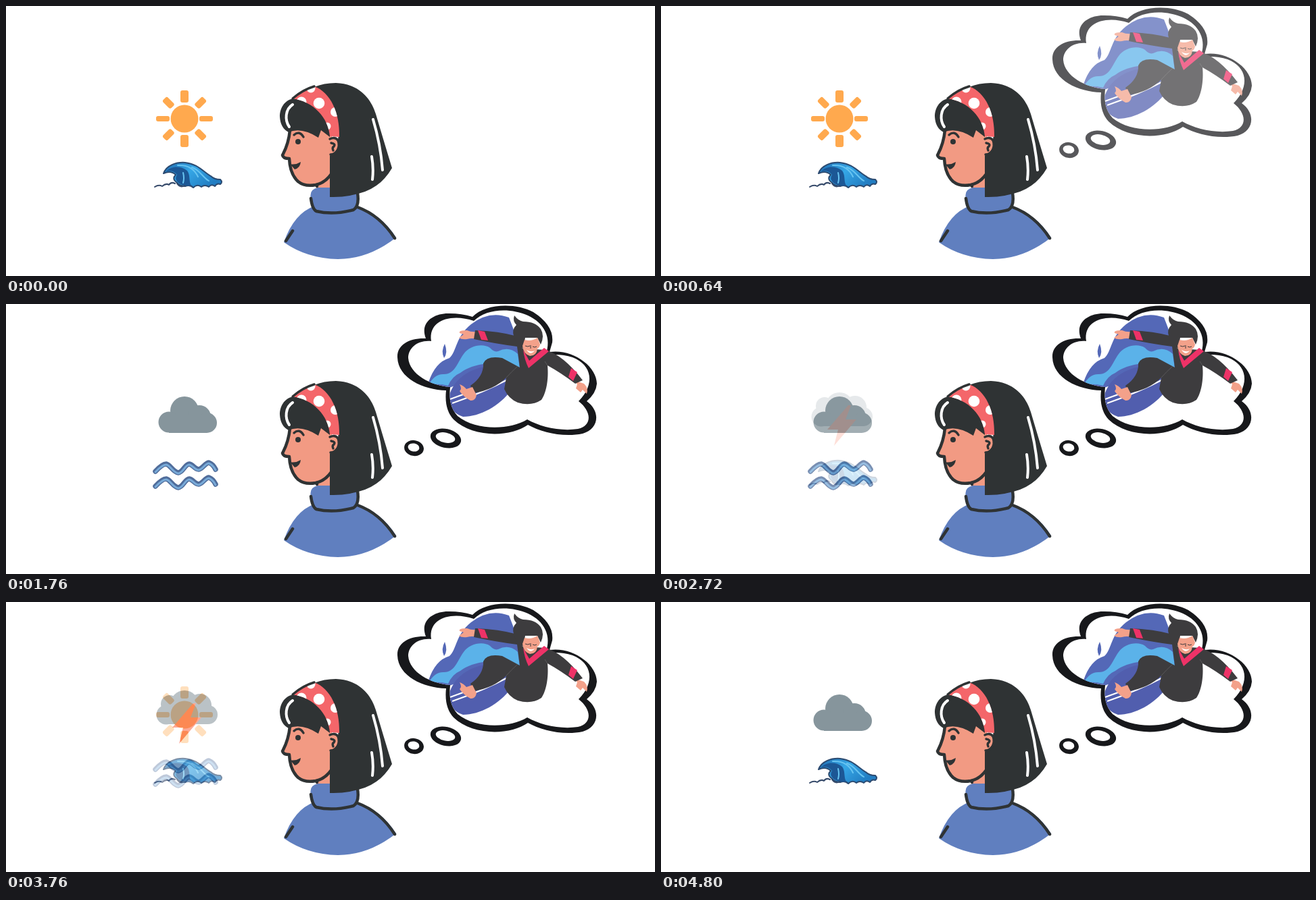
Recreate the animation shown at these times as an HTML page. Size 960 px wide and 400 px high, loop 5.36 s.

```html
<!DOCTYPE html>
<html lang="en">
<head>
<meta charset="utf-8">
<title>Daydream about surfing</title>
<style>
html, body { margin: 0; width: 100%; height: 100%; overflow: hidden; background: #fff; }
svg { display: block; width: 960px; height: 400px; }
#weather, #sea { isolation: isolate; }
#weather > g, #sea > g { mix-blend-mode: plus-lighter; opacity: 0; }
#thought { opacity: 0; }
.line { fill: none; stroke: #2f3334; stroke-width: 4.5; stroke-linecap: round; stroke-linejoin: round; }
.thin { stroke-width: 3.4; }
.shine { fill: none; stroke: #fff; stroke-width: 4; stroke-linecap: round; }
.ink { fill: #2f3334; }
.skin { fill: #f29a83; }
.wool { fill: #607fbf; }
.suit { fill: #3d3c3e; }
.tan { fill: #f3a18a; }
.pink { fill: #ee3267; }
</style>
</head>
<body>
<svg viewBox="0 0 960 400">
  <defs>
    <path id="inner" d="M629 55C609 53 595 65 595 80C597 104 628 121 657 123C655 142 658 155 668 166C695 188 745 187 771 171C790 182 820 189 846 185C868 180 866 159 847 144C872 119 867 90 838 79C826 75 812 74 798 76C808 50 796 28 772 17C745 5 710 7 692 25C660 14 624 23 629 55Z"/>
    <clipPath id="bubble"><use href="#inner"/></clipPath>
    <clipPath id="band"><path d="M423 137Q439 124 456 119C480 128 494 158 493 194L479 193C477 166 455 141 423 137Z"/></clipPath>
    <linearGradient id="water" x1="0" y1="0" x2="1" y2=".5">
      <stop offset="0" stop-color="#1d69ae"/>
      <stop offset=".5" stop-color="#35a6e6"/>
      <stop offset="1" stop-color="#227dc2"/>
    </linearGradient>
    <path id="ripple" d="M221 248Q231 237 237 237C243 238 247 249 255 250C262 249 265 237 271 237C277 238 279 245 285 245C291 244 295 235 300 235Q306 237 310 245"/>
  </defs>

  <g id="weather">
    <g id="sun" fill="#ffa94e"><circle cx="264" cy="167" r="20.5"/></g>
    <g id="cloud" fill="#86959c">
      <circle cx="264" cy="158" r="21"/><circle cx="286" cy="167" r="17"/>
      <circle cx="241" cy="175" r="15.5"/><circle cx="297" cy="176" r="15"/>
      <path d="M241 165H297V191H241Z"/>
    </g>
    <g id="storm">
      <g fill="#909da4">
        <circle cx="264" cy="152" r="21"/><circle cx="287" cy="153" r="17"/>
        <circle cx="242" cy="151" r="13"/><circle cx="237" cy="167" r="14.5"/>
        <circle cx="299" cy="167" r="14"/><path d="M237 155H299V181H237Z"/>
      </g>
      <path fill="#fb7454" d="M277 150L246 186H262L256 210L289 171H273L281 150Z"/>
    </g>
  </g>

  <g id="sea">
    <g id="wave" stroke-linejoin="round" stroke-linecap="round">
      <path fill="url(#water)" stroke="#2b4a70" stroke-width="2" d="M233 248C237 236 252 231 265 232C284 234 291 245 303 252Q308 257 317 257Q321 261 317 264Q312 262 309 267Q304 263 300 268Q294 264 289 268Q283 263 277 269Q272 264 265 267Q257 267 252 261Q245 256 251 250Q244 243 233 248Z"/>
      <path fill="#1c5795" d="M237 245C244 237 258 236 268 244C273 250 270 260 274 266Q262 268 254 261Q249 256 253 250Q247 242 237 245Z"/>
      <path fill="none" stroke="#67c4f1" stroke-width="2" d="M254 236C270 235 279 242 284 253M275 239C287 243 291 254 300 259M262 247Q264 255 262 262"/>
      <path fill="none" stroke="#364a6a" stroke-width="2" d="M220 268Q226 264 231 267Q237 262 241 265Q244 260 250 263M253 263Q258 270 264 266"/>
    </g>
    <g id="ripples" fill="none" stroke-linecap="round" stroke-linejoin="round">
      <g stroke="#506d9b" stroke-width="7.5"><use href="#ripple"/><use href="#ripple" y="22"/></g>
      <g stroke="#78aad8" stroke-width="3"><use href="#ripple" y="1"/><use href="#ripple" y="23"/></g>
    </g>
  </g>

  <g id="woman">
    <path class="wool" d="M411 350Q426 307 457 296H518Q556 309 577 343Q536 375 491 375Q445 374 411 350Z"/>
    <path class="skin" d="M459 255H484V280H459Z"/>
    <path class="wool" d="M451 285Q448 272 461 269H480L520 276Q524 295 515 302Q484 310 460 305Q453 301 451 285Z"/>
    <path class="line" d="M451 285Q453 301 459 304Q484 310 514 302Q523 296 520 277M520 298Q553 310 575 344M414 348L424 333M460 262V267"/>
    <path class="skin" d="M420 180C418 205 412 215 409 221Q410 226 420 226Q419 248 431 260Q442 268 458 265Q474 261 482 248V180Z"/>
    <path class="line" d="M420 184C418 205 412 215 409 221Q410 226 419 226Q420 249 432 260Q442 268 458 265Q472 262 481 249"/>
    <path class="ink" d="M456 120Q470 114 488 114C522 115 540 137 547 160Q557 194 571 240Q557 265 531 275Q505 284 479 283V222L490 206L492 190C492 158 478 129 456 120Z"/>
    <path class="ink" d="M425 137C411 140 405 152 405 164Q406 181 418 187Q437 179 462 195L466 184L479 194C481 164 456 139 425 137Z"/>
    <g clip-path="url(#band)">
      <path fill="#f4666a" d="M415 110H500V200H415Z"/>
      <g fill="#fff">
        <circle cx="463" cy="144" r="8.3"/><circle cx="437" cy="142" r="7.5"/>
        <circle cx="451" cy="122" r="6.5"/><circle cx="487" cy="157" r="7"/>
        <circle cx="475" cy="178" r="5.5"/>
      </g>
    </g>
    <path class="line thin" d="M424 137Q439 124 456 119"/>
    <path class="skin" d="M478 198Q485 193 490 198Q495 205 490 214Q487 220 479 221Z"/>
    <path class="line thin" d="M479 197Q487 193 491 199Q494 207 490 214Q486 220 480 220M481 203Q488 204 485 208Q482 210 484 214"/>
    <circle class="ink" cx="432" cy="201" r="4"/>
    <path class="line thin" d="M426 191Q434 184 440 194"/>
    <path class="ink" d="M420 234Q428 236 436 231Q435 240 427 242Z"/>
    <path class="shine" d="M424 146C413 153 412 169 419 179"/>
    <path class="shine" d="M543 168Q554 205 557 243M541 223Q544 240 542 257"/>
  </g>

  <g id="thought">
    <path fill="#17181b" d="M621 51C611 25 636 13 656 14Q674 14 690 19C708 0 752 -3 780 12Q811 32 808 57L804 71C838 66 874 92 874 118Q873 132 859 144C881 160 876 186 853 192C824 198 792 190 772 179C745 198 690 198 662 171Q648 156 651 128C617 127 580 110 579 79C578 61 596 50 621 51Z"/>
    <use href="#inner" fill="#fff"/>
    <g clip-path="url(#bubble)">
      <path fill="#5468b7" d="M625 116Q635 86 656 80C667 70 665 48 688 30Q715 9 744 20Q752 40 760 64V96L690 112L650 126Z"/>
      <path fill="#5bb2e9" d="M625 120Q634 103 648 104C664 104 668 86 677 74C686 61 706 58 716 65Q722 72 728 70Q744 62 757 74L760 96L712 88Q686 91 672 102Q660 107 654 121Q638 117 625 120Z"/>
      <path fill="#515eae" d="M655 138C663 105 697 90 729 92Q746 108 747 128C730 151 701 167 676 167Q655 160 655 138Z"/>
      <path fill="none" stroke="#fff" stroke-width="2" d="M657 141Q700 126 739 107M660 147Q706 131 742 112"/>
    </g>
    <path fill="#5468b7" d="M649 59Q654 72 648 80Q643 70 649 59Z"/>
    <path class="tan" d="M698 41Q688 42 682 39Q669 39 671 43L677 45L670 50Q674 53 682 52Q689 50 698 52ZM840 113L855 118Q862 125 859 133L853 127L850 131L843 125L845 119Z"/>
    <path class="suit" d="M694 39Q728 40 757 48L764 66L798 68Q825 76 853 113L842 118Q821 102 801 91C803 112 799 132 792 142Q777 152 757 146Q743 140 737 126L740 109Q722 127 692 132L687 121Q707 107 706 88Q711 76 734 80L760 94L756 63Q725 59 692 52Z"/>
    <path fill="none" stroke="#59585a" d="M757 92Q747 101 740 109M801 91L797 85"/>
    <path class="pink" d="M698 39L708 41L713 54L703 53ZM836 95L845 101L839 114L832 108ZM765 68L774 84L796 65L803 70L773 95Q767 83 765 68Z"/>
    <path class="tan" d="M671 119Q677 121 681 126L690 123L696 135Q694 144 687 143Q677 138 671 129Q675 126 671 119Z"/>
    <path class="suit" d="M752 17Q758 25 765 26Q783 26 791 37Q797 47 791 60L786 50H768L765 66Q753 59 751 47Q748 38 755 31Q749 25 752 17Z"/>
    <path class="tan" d="M767 53Q777 56 786 50L790 60Q789 65 786 66Q785 77 775 77Q765 74 764 62Z"/>
    <path fill="none" stroke="#3d3c3e" d="M768 62Q772 64 775 62M779 63Q782 65 785 63M776 61V66"/>
    <path fill="#fff" d="M770 68Q777 72 782 69Q776 77 770 68Z"/>
    <g fill="#17181b">
      <ellipse cx="650.5" cy="199" rx="23" ry="14" transform="rotate(12 650.5 199)"/>
      <ellipse cx="603.5" cy="213.5" rx="14.5" ry="11.5" transform="rotate(10 603.5 213.5)"/>
    </g>
    <g fill="#fff">
      <ellipse cx="650" cy="198" rx="14.5" ry="7.5" transform="rotate(12 650 198)"/>
      <ellipse cx="603" cy="212.5" rx="8.5" ry="6" transform="rotate(10 603 212.5)"/>
    </g>
  </g>
</svg>
<script>
const LOOP = 5360, STEP = 80;
const byId = id => document.getElementById(id);

// Sun rays: upright ones are wide, level ones thin, slanted ones short.
for (let i = 0; i < 8; i++) {
  const [w, from, len] = i % 2 ? [10, 25, 17] : i % 4 ? [8, 22, 20] : [12, 24, 18];
  const ray = document.createElementNS("http://www.w3.org/2000/svg", "rect");
  const attrs = { x: 264 - w / 2, y: 167 - from - len, width: w, height: len, rx: 3,
                  transform: `rotate(${i * 45} 264 167)` };
  for (const key in attrs) ray.setAttribute(key, attrs[key]);
  byId("sun").append(ray);
}

// Start time, number of fade steps, sky and water shown afterwards.
const scenes = [
  [0, 1, "sun", "wave"],
  [1680, 2, "cloud", "ripples"],
  [2720, 3, "storm", "wave"],
  [3760, 2, "sun", "ripples"],
  [4640, 3, "cloud", "wave"]
];

// Each row of the table is [time, opacity], held until the next row.
function play(id, table) {
  const frames = table.map(([t, opacity]) => ({ offset: t / LOOP, opacity, easing: "step-end" }));
  frames.push({ offset: 1, opacity: table[table.length - 1][1] });
  byId(id).animate(frames, { duration: LOOP, iterations: Infinity });
}

// A fade is already under way for part of a step when it first shows.
const mix = (k, steps) => (k - .4) / (steps - .4);

for (const id of ["sun", "cloud", "storm", "wave", "ripples"]) {
  const table = [];
  let now = 0;
  for (const [start, steps, ...shown] of scenes) {
    const next = shown.includes(id) ? 1 : 0;
    for (let k = 1; k <= steps; k++)
      table.push([start + (k - 1) * STEP, now + (next - now) * mix(k, steps)]);
    now = next;
  }
  play(id, table);
}

const fade = [0, .06, .14, .23, .32, .42, .52, .62, .72, .81, .89, .95, 1];
play("thought", fade.map((v, k) => [k * STEP, v]));
</script>
</body>
</html>
```
